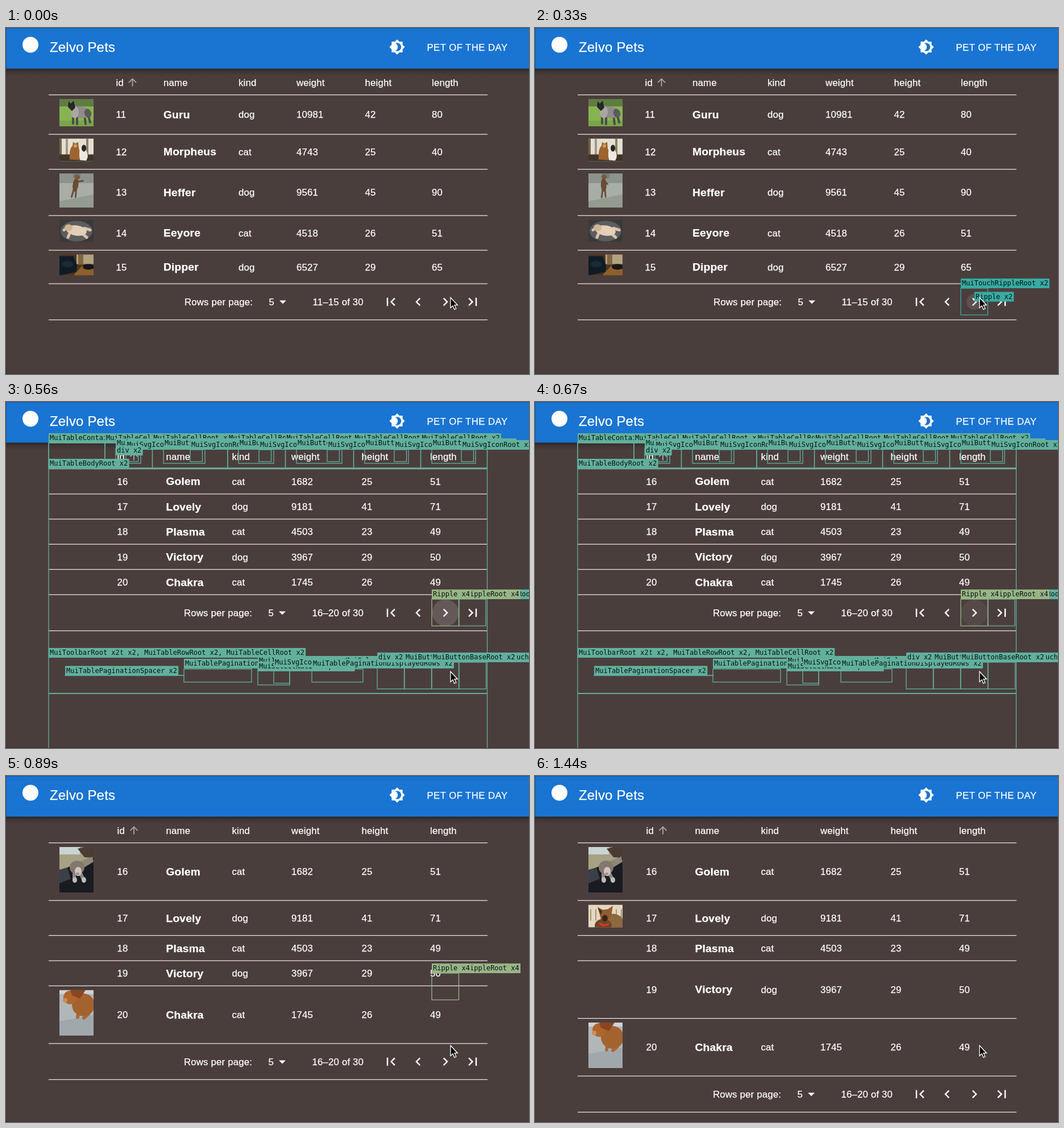
Animation of 920 by 609 pixels, one loop 1780 ms. Source, as an HTML page:

```html
<!DOCTYPE html>
<html lang="en">
<head>
<meta charset="utf-8">
<title>Pet table</title>
<style>
html, body { margin: 0; width: 100%; height: 100%; overflow: hidden; background: #4a3e3d; }
svg { display: block; }
text { font: 16.8px "Liberation Sans", Arial, sans-serif; letter-spacing: .18px; fill: #fff; stroke: #fff; stroke-width: .25px; }
.title { font-size: 24px; }
.nav { letter-spacing: .42px; }
.name { font-size: 19.2px; font-weight: bold; }
.tag { font: 12px "DejaVu Sans Mono", monospace; letter-spacing: 0; fill: #071413; stroke: none; }
</style>
</head>
<body>
<svg id="stage" width="920" height="609" viewBox="0 0 920 609">
  <defs>
    <linearGradient id="shade" x2="0" y2="1">
      <stop offset="0" stop-color="#000" stop-opacity=".42"/>
      <stop offset=".4" stop-color="#000" stop-opacity=".17"/>
      <stop offset="1" stop-color="#000" stop-opacity="0"/>
    </linearGradient>
  </defs>
  <rect width="920" height="609" fill="#4a3e3d"/>
  <rect y="71" width="920" height="13" fill="url(#shade)"/>
  <rect width="920" height="71.5" fill="#1974d2"/>
  <path d="M0 .5H920M0 608.5H920M.5 0V609" stroke="#000" stroke-opacity=".22"/>
  <circle cx="43" cy="29.5" r="14" fill="#fff"/>
  <text class="title" x="77" y="42">Zelvo Pets</text>
  <text class="nav" x="740.5" y="39.5">PET OF THE DAY</text>
  <path transform="translate(688 33.5) scale(1.2) translate(-12 -12)" fill="#fff" d="M20 8.69V4h-4.69L12 .69 8.69 4H4v4.69L.69 12 4 15.31V20h4.69L12 23.31 15.31 20H20v-4.69L23.31 12 20 8.69zM12 18c-.89 0-1.74-.2-2.5-.55C11.56 16.5 13 14.42 13 12s-1.44-4.5-3.5-5.45C10.26 6.2 11.11 6 12 6c3.31 0 6 2.69 6 6s-2.69 6-6 6z"/>
  <g id="table"></g>
  <g id="marks"></g>
  <path d="M782 474.5V492.5L786 488.8 788.8 495.3 791.8 494 789 487.7H794.3Z" fill="#000" stroke="#fff" stroke-width="1.3"/>
</svg>
<script>
const LOOP = 1780;
const TEAL = '#38aba2', SAGE = '#62b09c', MOSS = '#8cb894', OLIVE = '#98b586';
const LEFT = 75, RIGHT = 847, TOP = 117.5;
const edges = [75, 174, 257.5, 390, 491.5, 611.5, 729.5, 846.5];
const heads = ['id', 'name', 'kind', 'weight', 'height', 'length'];
const icons = {
  up: 'M4 12l1.41 1.41L11 7.83V20h2V7.83l5.58 5.59L20 12l-8-8-8 8z',
  first: 'M18.41 16.59L13.82 12l4.59-4.59L17 6l-6 6 6 6zM6 6h2v12H6z',
  prev: 'M15.41 16.59L10.83 12l4.58-4.59L14 6l-6 6 6 6z',
  next: 'M8.59 16.59L13.17 12 8.59 7.41 10 6l6 6-6 6z',
  last: 'M5.59 7.41L10.18 12l-4.59 4.59L7 18l6-6-6-6zM16 6h2v12h-2z',
  drop: 'M7 10l5 5 5-5z'
};
const pageA = {
  cols: [193.5, 277, 409, 511, 631.5, 749], arrow: 222.5,
  rows: ['11 Guru dog 10981 42 80', '12 Morpheus cat 4743 25 40', '13 Heffer dog 9561 45 90',
    '14 Eeyore cat 4518 26 51', '15 Dipper dog 6527 29 65'],
  pics: [guru, morpheus, heffer, eeyore, dipper]
};
const pageB = {
  cols: [195.5, 281.5, 397.5, 502, 625.5, 746], arrow: 225,
  rows: ['16 Golem cat 1682 25 51', '17 Lovely dog 9181 41 71', '18 Plasma cat 4503 23 49',
    '19 Victory dog 3967 29 50', '20 Chakra cat 1745 26 49'],
  pics: [golem, lovely, null, null, chakra]
};
const tallA = [69.5, 61.5, 81.5, 61, 59], photoA = [48, 40, 60, 39, 37];
const SLIM = 44.3, MID = 61.7, TALL = 101.5;

// drawing helpers
const box = (x, y, w, h, fill) => `<rect x="${x}" y="${y}" width="${w}" height="${h}" fill="${fill}"/>`;
const oval = (x, y, rx, ry, fill, turn = 0) =>
  `<ellipse cx="${x}" cy="${y}" rx="${rx}" ry="${ry}" fill="${fill}" transform="rotate(${turn} ${x} ${y})"/>`;
const shape = (d, fill) => `<path d="${d}" fill="${fill}"/>`;
const limb = (d, color, w) => `<path d="${d}" fill="none" stroke="${color}" stroke-width="${w}" stroke-linecap="round"/>`;
const text = (s, x, y, cls = '') => `<text class="${cls}" x="${x}" y="${y}">${s}</text>`;
const line = y => `<path d="M${LEFT} ${y}H${RIGHT}" stroke="#e9e5e4" stroke-width="1.25"/>`;
const icon = (k, x, y, scale = 1.2, fill = '#fff') =>
  `<path d="${icons[k]}" fill="${fill}" transform="translate(${x} ${y}) scale(${scale}) translate(-12 -12)"/>`;
const frame = (x, y, w, h, color) =>
  `<rect x="${x}" y="${y}" width="${w}" height="${h}" fill="none" stroke="${color}" stroke-width="1.3"/>`;
const label = (s, x, y, color) =>
  box(x, y, (s.length * 7.224 + 4.3).toFixed(1), 17, color) + text(s, x + 2, y + 12, 'tag');
const photo = (art, y, h) =>
  `<svg x="94" y="${y}" width="60" height="${h}" viewBox="0 0 60 ${h}">${art}</svg>`;

// photos as flat shapes
function guru() {
  return box(0, 0, 60, 48, '#88b352') + box(0, 0, 60, 13, '#5f7d42') + box(0, 38, 60, 10, '#79a648') +
    limb('M24 26V43M31 28V44M50 26L54 41M44 28L46 44', '#4d4b49', 4) +
    oval(37, 23, 17, 10, '#8d8c8b', 12) + oval(27, 23, 7, 11, '#aaa7a3') +
    shape('M16 4L20 8 25 3 28 15 22 21 15 14Z', '#262626') + oval(50, 25, 6, 8, '#5c5b5b', -20);
}
function morpheus() {
  return box(0, 0, 60, 40, '#e3e0d3') + box(0, 0, 4, 30, '#746346') + box(11, 0, 4, 30, '#a4977e') +
    box(47, 0, 4, 28, '#8b8069') + box(0, 28, 60, 12, '#43342a') +
    shape('M18 37Q17 17 23 13L24 6 28 9 33 6 34 17Q39 29 35 38Z', '#9d642f') +
    shape('M36 38Q33 22 38 15L38 9 42 12 46 9 46 19Q53 31 47 39Z', '#eee9e0') +
    oval(43, 17, 4, 6, '#2a2523') + oval(28, 13, 3, 3, '#d59a59');
}
function heffer(pose) {
  const lean = [8, 3, -4, -1, 2][pose];
  return box(0, 0, 60, 60, '#a8aea6') + box(0, 0, 60, 17, '#8c938d') + box(24, 0, 13, 8, '#74807a') +
    shape('M0 49L60 37V60H0Z', '#949b91') +
    `<g transform="rotate(${lean} 27 30)">` + limb('M25 28L23 42M29 28L30 41', '#665141', 3) +
    oval(27, 20, 5, 12, '#6b4b32') + oval(28, 6, 5, 4, '#79583b', 15) +
    limb(pose ? 'M29 14L34 19' : 'M29 14L39 11', '#68472f', 2.6) + '</g>';
}
function eeyore() {
  return box(0, 0, 60, 39, '#39393b') + oval(30, 20, 28, 18, '#5d5d5f') +
    limb('M16 13L8 18M18 24L15 31M41 25L48 31M44 15L54 18', '#d8c4a9', 5) +
    oval(30, 19, 18, 9, '#e2cfb5', 9) + oval(16, 14, 7, 6, '#cfb494');
}
function dipper() {
  return box(0, 0, 60, 37, '#4a351f') + box(30, 0, 30, 17, '#b4a17e') + box(33, 0, 9, 18, '#7d6743') +
    shape('M27 34L40 20 60 26V37H25Z', '#8f6029') + shape('M0 3H25L31 20 30 31 0 37Z', '#101c25') +
    oval(14, 17, 10, 6, '#1b2a34') + oval(51, 22, 10, 5, '#17171a');
}
function golem() {
  return box(0, 0, 60, 80, '#181b20') + shape('M0 0H60V18L28 30 0 42Z', '#a7a184') + box(0, 0, 36, 13, '#cbd3d4') +
    shape('M32 3L44 0H60V19L44 18Z', '#4a3c34') + shape('M0 40L14 36 20 56 0 64Z', '#3a4048') +
    shape('M30 28L58 17 60 26 40 38Z', '#8f8676') + limb('M26 44V56M37 46L42 57', '#8f8682', 6) +
    oval(31, 36, 13, 12, '#837770') + oval(33, 43, 6, 8, '#cbc5c1') + oval(32, 47, 3, 2, '#a98581') +
    oval(27, 58, 4, 5, '#c2bab6') + oval(43, 58, 4, 5, '#c2bab6');
}
function lovely() {
  let slats = '';
  for (let x = 3; x < 60; x += 9) slats += box(x, 8, 2, 20, '#a89574');
  return box(0, 0, 60, 40, '#e4d8c2') + slats + oval(43, 32, 19, 16, '#8c6a3e') + oval(26, 37, 15, 12, '#6f4424') +
    shape('M16 4L25 9 34 8 43 2 40 20 31 31 22 25Z', '#8f5d30') + shape('M17 6L24 11 22 18Z', '#3f2a1d') +
    oval(29, 24, 5, 6, '#38271d') + limb('M20 33Q27 39 35 34', '#d93a25', 3);
}
function chakra() {
  return box(0, 0, 60, 80, '#b1b7b9') + box(0, 0, 60, 7, '#ced2d1') + shape('M0 55L60 44V80H0Z', '#a1a8ac') +
    limb('M34 37L32 48M51 42L43 49', '#a9683a', 6) + oval(42, 26, 20, 20, '#a2632f', 18) +
    oval(19, 13, 12, 12, '#b0652c') + shape('M19 0H46L36 15 22 9Z', '#8b4520') + oval(10, 18, 4, 4, '#c98c5b');
}

// table content for one state
function table(s) {
  const p = s.page, xs = p.cols;
  let out = heads.map((h, i) => text(h, xs[i], 101.5)).join('') +
    icon('up', p.arrow, 95.5, .9, '#aaa3a1') + line(TOP);
  let y = TOP;
  p.rows.forEach((row, r) => {
    const h = s.tall[r], mid = y + h / 2;
    row.split(' ').forEach((v, i) => {
      out += i === 1 ? text(v, xs[i], mid + 6.7, 'name') : text(v, xs[i], mid + 6);
    });
    if (s.photo[r]) out += photo(p.pics[r](s.pose || 0), y + 7.5, s.photo[r]);
    y += h;
    out += line(y);
  });
  const mid = y + 32, b = s.range ? 1 : 0;
  if (s.ripple) out += `<circle cx="773" cy="${mid}" r="${s.ripple[0]}" fill="#fff" opacity="${s.ripple[1]}"/>`;
  out += text('Rows per page:', 314 - b, mid + 6) + text('5', 462.5 - b, mid + 6) + icon('drop', 487 - b, mid) +
    text(b ? '16–20 of 30' : '11–15 of 30', 539.5 - b, mid + 6);
  ['first', 'prev', 'next', 'last'].forEach((k, i) => out += icon(k, 677 + 48 * i, mid));
  return out + line(y + 63.5);
}

// render outlines and their name tags; n is the render count
function fullMarks(n) {
  const c = n > 1 ? SAGE : TEAL;
  let shapes = '', tags = '';
  const rect = (x, y, w, h) => shapes += frame(x, y, w, h, c);
  const tag = (names, x, y) =>
    tags += label(names.split(', ').map(s => n > 1 ? `${s} x${n}` : s).join(', '), x, y, c);
  const cells = (y, h) => edges.slice(0, -1).forEach((x, i) => rect(x, y, edges[i + 1] - x, h));
  const cellTags = y => edges.slice(1, -1).forEach(x => tag('MuiTableCellRoot', x, y));

  rect(LEFT, 72, edges[7] - LEFT, 600);
  cells(72, 44);
  shapes += `<path d="M75 117H846.5M75 513H846.5" stroke="${c}" stroke-width="2"/>`;
  tag('MuiTableContainerRoot, MuiTableRoot, MuiTableHeadRoot', 75, 55);
  cellTags(55);
  const sort = [[193, 44, 211], [277, 73, 324], [409, 62, 445], [511, 80, 565], [631, 77, 683], [749, 77, 801]];
  sort.forEach(([x, w, sx]) => {
    rect(x, 82, w, 26);
    rect(sx, 84, 21.5, 21);
    tag('MuiButtonBaseRoot', x, 64);
    tag('MuiSvgIconRoot', sx, 67);
  });
  tag('div', 193, 77);

  if (n > 1) tag('MuiTableBodyRoot', 75, 100);
  else {
    rect(0, 0, 920, 609);
    let y = TOP;
    tallA.forEach((h, r) => {
      const mid = y + h / 2, tagY = Math.floor(y) - 17;
      cells(y, h);
      rect(277, mid - 14, 93, 27);
      tag((r ? '' : 'MuiTableBodyRoot, ') + 'MuiTableRowRoot, MuiTableCellRoot', 75, tagY);
      cellTags(tagY);
      tag('Link, MuiTypographyRoot', 277, Math.round(mid - 31.5));
      y += h;
    });
  }

  rect(104, 481, 209, .5);
  rect(313, 470, 119, 23);
  rect(443, 466, 56, 32);
  rect(471, 468, 28, 27);
  rect(538, 470, 90, 23);
  for (let i = 0; i < 4; i++) rect(653 + 48 * i, 458, 47.5, 47);
  tag('MuiTableFooterRoot, MuiTableRowRoot, MuiTableCellRoot', 75, 433);
  tag('MuiToolbarRoot', 75, 433);
  tag('MuiTablePaginationSpacer', 104, 464.5);
  tag('MuiTablePaginationSelectLabel', 313, 452);
  tag('MuiInputBaseRoot, MuiSelectSelect', 443, 447);
  tag('MuiSelectNativeInput', 443, 457);
  tag('MuiSvgIconRoot', 471, 450);
  tag('MuiTablePaginationDisplayedRows', 538, 452);
  tag('div, MuiButtonBaseRoot', 653, 441);
  tag('MuiButtonBaseRoot', 797, 441);
  tag('MuiButtonBaseRoot, MuiTouchRippleRoot', 701, 441);
  if (n > 1) {
    rect(797, 347, 47, 47);
    tag('MuiButtonBaseRoot', 749, 441);
    tag('MuiTouchRippleRoot', 797, 330);
  }
  return shapes + tags;
}
const clickMarks = n => {
  const c = n > 2 ? MOSS : TEAL, x = n > 1 ? ' x' + n : '';
  return frame(749, 458, 47.5, 47, TEAL) +
    label('MuiTouchRippleRoot' + x + (n > 2 ? ', MuiButtonBaseRoot' : ''), 749, 441, c) +
    label('Ripple' + x, 773, 464.5, c);
};
const lateMarks = () => frame(749, 347, 47.5, 47, OLIVE) +
  label('MuiTouchRippleRoot x4', 749, 330, OLIVE) + label('Ripple x4', 749, 330, OLIVE);

const before = o => ({ page: pageA, tall: tallA, photo: photoA, marks: () => '', ...o });
const after = (tall, photo, o) => ({ page: pageB, tall, photo, range: true, marks: () => '', ...o });
const slim = Array(5).fill(SLIM), none = [];
const busy = () => fullMarks(2) + lateMarks();
const steps = [
  [0, before({ pose: 0 })],
  [110, before({ pose: 4 })],
  [220, before({ pose: 1, marks: () => clickMarks(1) })],
  [330, before({ pose: 3, ripple: [14, .1], marks: () => clickMarks(2) })],
  [440, before({ pose: 2, range: true, ripple: [23, .15], marks: () => fullMarks(1) + clickMarks(3) })],
  [560, after(slim, none, { ripple: [23.5, .14], marks: busy })],
  [670, after(slim, none, { ripple: [23.5, .06], marks: busy })],
  [780, after([TALL, SLIM, SLIM, SLIM, TALL], [80, 0, 0, 0, 10], { marks: busy })],
  [890, after([TALL, MID, SLIM, SLIM, TALL], [80, 0, 0, 0, 80], { marks: lateMarks })],
  [1000, after([TALL, MID, SLIM, SLIM, TALL], [80, 40, 0, 0, 80])],
  [1110, after([TALL, MID, SLIM, TALL, TALL], [80, 40, 0, 0, 80])]
];

const tableBox = document.getElementById('table'), marksBox = document.getElementById('marks');
let shown = -1;
function render(t) {
  const k = steps.filter(s => s[0] <= t).length - 1;
  if (k === shown) return;
  shown = k;
  const s = steps[k][1];
  tableBox.innerHTML = table(s);
  marksBox.innerHTML = s.marks();
}
const start = performance.now();
function tick() {
  render((performance.now() - start) % LOOP);
  requestAnimationFrame(tick);
}
tick();
</script>
</body>
</html>
```
